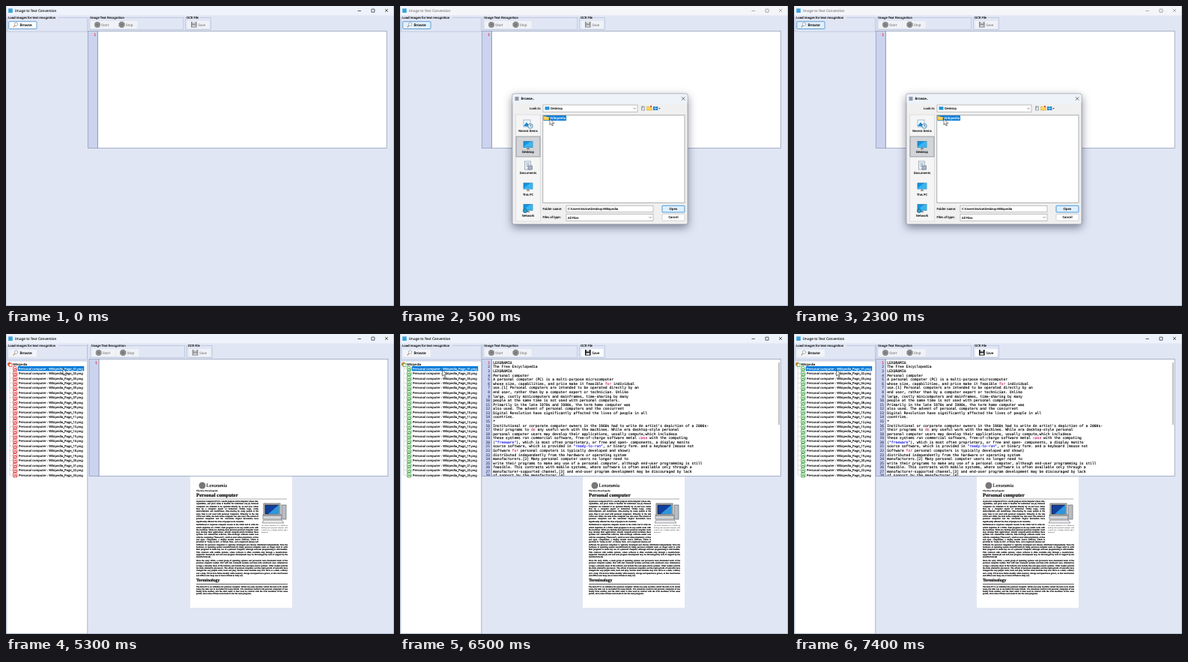
These frames come from a looping animation (518 by 400 pixels, 8 s). An HTML page:

```html
<!DOCTYPE html>
<html lang="en">
<head>
<meta charset="utf-8">
<title>Image to Text Conversion</title>
<style>
html, body { margin: 0; width: 100%; height: 100%; overflow: hidden; background: #e0e6f4; }
svg { display: block; width: 518px; height: 400px; font-family: "Noto Sans", sans-serif; text-rendering: geometricPrecision; }
text { white-space: pre; stroke-width: .13px; }
.mono { font-family: "DejaVu Sans Mono", monospace; }
.serif { font-family: "Liberation Serif", serif; }
.dialog { filter: drop-shadow(0 4px 6px rgba(20, 25, 45, .5)); }
.page { font: 2.85px/3.32px "Liberation Serif", serif; color: #000; text-align: justify; -webkit-text-stroke: .16px #000; }
.page p { margin: 0 0 1.4px; }
.page h2 { font-size: 5.8px; line-height: 7px; margin: 0 0 2px; border-bottom: .5px solid #555; }
.page figure { float: right; width: 35px; height: 54px; margin: 2px 0 0 4px; font-size: 2.3px; line-height: 3px; -webkit-text-stroke: 0; }
.page svg { width: 35px; height: 31px; }
</style>
</head>
<body>
<svg id="stage" viewBox="0 0 518 400"></svg>
<script>
const BLUE = '#0078d7', LINE = '#b4bed6', PANEL = '#e0e6f4';

const ocr = `LEXORAMIA
The Free Encyclopedia
LEXORAMIA
Personal computer
A personal computer (PC) is a multi-purpose microcomputer
whose size, capabilities, and price make it feasible for individual
use.[1] Personal computers are intended to be operated directly by an
end user, rather than by a computer expert or technician. Unlike
large, costly minicomputers and mainframes, time-sharing by many
people at the same time is not used with personal computers.
Primarily in the late 1970s and 1980s, the term home computer was
also used. The advent of personal computers and the concurrent
Digital Revolution have significantly affected the lives of people in all
countries.
*
Institutional or corporate computer owners in the 1960s had to write An artist's depiction of a 2000s-
their programs to do any useful work with the machines. While era desktop-style personal
personal computer users may develop their applications, usually compute,which includesa
these systems run commercial software, free-of-charge software metal case with the computing
("freeware"), which is most often proprietary, or free and open- components, a display monito
source software, which is provided in "ready-to-run", or binary form. and a keyboard (mouse not
Software for personal computers is typically developed and shown)
distributed independently from the hardware or operating system
manufacturers.[2] Many personal computer users no longer need to
write their programs to make any use of a personal computer, although end-user programming is still
feasible. This contrasts with mobile systems, where software is often available only through a
manufacturer-supported channel,[3] and end-user program development may be discouraged by lack
of support by the manufacturer.[4]`.split('\n');

const later = `Since the early 1990s, a small group of operating systems and processors have dominated much of the personal computer market, first with text command systems and then with windowed ones. Alternatives occupy a minority share of the industry and include free and open-source systems. Other makers provide the main alternative processors. The advent of personal computers and the rapid growth of networks have changed the way people work, learn and play, and the same machine may now serve as a desk, a library and a shop. Prices have fallen steadily while memory, storage and speed have grown, so that most homes and offices now keep one or more of them in daily use.`;
const terms = `The term PC is an initialism for personal computer. While one early machine carried the term in its model name, the term was in use before for many brands. It is sometimes useful to tell personal computers of one family from another, and the short name is then used in contrast with the rival machines of the same period, since none of these were made to run the same programs.`;

const esc = s => s.replace(/&/g, '&amp;').replace(/</g, '&lt;');
const rect = (x, y, w, h, fill, stroke = 'none', more = '') =>
  `<rect x="${x}" y="${y}" width="${w}" height="${h}" fill="${fill}" stroke="${stroke}" stroke-width=".7" ${more}/>`;
const path = (d, stroke, fill = 'none', width = .7) =>
  `<path d="${d}" stroke="${stroke}" fill="${fill}" stroke-width="${width}"/>`;
const circle = (x, y, r, fill, stroke = 'none') =>
  `<circle cx="${x}" cy="${y}" r="${r}" fill="${fill}" stroke="${stroke}" stroke-width=".8"/>`;
const rawText = (x, y, s, size = 4.15, fill = '#000', more = '') =>
  `<text x="${x}" y="${y}" font-size="${size}" fill="${fill}" stroke="${fill}" ${more}>${s}</text>`;
const text = (x, y, s, ...style) => rawText(x, y, esc(s), ...style);
const move = (x, y, s) => `<g transform="translate(${x} ${y})">${s}</g>`;

const cursor = (x, y) => move(x, y, path('M0 0v8l1.9-1.7 1.3 3 1.3-.6-1.3-2.9h2.6z', '#222', '#fff', .6));
const folder = (x, y) => move(x, y,
  path('M0 5.5v-5h2.6l1 1h3.2v4z', '#c9921a', '#ffcf4d', .4) + path('M.3 2.4h6.2', '#ffe9a6'));
const monitor = (x, y, tower) => move(x, y,
  rect(-6, -5, 12, 8, '#1593e0', '#2c6d9c') + path('M-6 2L3-5h3v8h-12z', 'none', '#39b5f0') +
  path('M-2 5h4M0 3v2', '#667', 'none', 1) + (tower ? circle(-4, 3.5, 2.6, '#2fa0cf', '#176387') : ''));

function titleBar(active) {
  const ink = active ? '#222' : '#888';
  return rect(0, 0, 518, 12.5, active ? '#eef3fb' : '#f3f5f9') +
    rect(3.2, 3.4, 5.6, 5.6, '#3ba3dc') +
    text(12, 8, 'Image to Text Conversion', 4.64, ink) +
    path('M469.5 6.5h4.5M488 4.2h4v4h-4zM506 4l4 4M510 4l-4 4', ink);
}

function group(x, y, w, h, label) {
  return rect(x, y, w, h, 'none', LINE) +
    rect(x + 1, 13, label.length * 2.08 + 1, 4.7, PANEL) + text(x + 1.5, 17.1, label);
}

function toolbar({ dx, browse, canSave }) {
  const off = '#8c8c8c', save = canSave ? '#111' : off;
  const fill = browse === 'hover' ? '#e3f0fb' : browse === 'focus' ? '#fdfdfe' : '#f2f4f9';
  return group(1.5, 15.5, 107, 18.5, 'Load images for text recognition') +
    rect(3.7, 20.7, 37.3, 9.8, fill, browse ? '#2b7fc4' : 'none', 'rx=".8"') +
    circle(13.5, 24.2, 2.2, '#f4fafe', '#8fa3b5') + path('M12 25.9l-2.3 2.5', '#c18b5a', 'none', 1.2) +
    text(18.5, 27, 'Browse', 4.65) +
    move(dx, 0,
      group(110.8, 15.5, 126, 16, 'Image Text Recognition') +
      rect(113, 20, 31.5, 10, '#f0f2f7') + circle(122, 24.9, 4, off) +
      path('M120.8 22.8l3.4 2.1-3.4 2.1z', 'none', '#777') + text(127.3, 26.5, 'Start', 4.5, off) +
      rect(145, 20, 30.5, 10, '#f0f2f7') +
      path('M152.8 20.8h3.4l2.4 2.4v3.4l-2.4 2.4h-3.4l-2.4-2.4v-3.4z', 'none', off) +
      rect(152.8, 23.4, 3.4, 3.2, '#777') + text(160, 26.5, 'Stop', 4.5, off) +
      group(239.5, 15.5, 34, 16, 'OCR File') +
      rect(242, 20, 29.5, 10, canSave ? '#fbfcfe' : '#f0f2f7') +
      rect(247, 21, 7.6, 7.6, save) + rect(248.7, 21, 4.2, 2.6, '#d7dae0') +
      rect(248.4, 25, 4.8, 3, '#c3c7d0') + text(256.5, 26.5, 'Save', 4.5, save));
}

function editor(dx, lines) {
  const tint = color => `<tspan fill="${color}" stroke="${color}">$&</tspan>`;
  const paint = s => esc(s)
    .replace(/\b(do|case|for)\b/g, tint('#c0206a'))
    .replace(/"[a-z-]+"(?=[),])/g, tint('#1717e0'));
  const rows = lines.map((s, i) => {
    const y = 39.9 + i * 5.575;
    return text(120.2, y, String(i + 1), 4.7, i ? '#3c4670' : '#e8283c', 'class="mono" text-anchor="end"') +
      rawText(124.2, y, paint(s), 4.7, '#000', 'class="mono"');
  }).join('');
  const scrollbar = lines.length > 1 ? path('M506 38v83', '#858585', 'none', 1) : '';
  return move(dx, 0, rect(109.3, 33.5, 398.9, 156, '#fff') + rect(109.3, 33.5, 13, 156, '#cbd3ef') +
    `<g clip-path="url(#edit)">${rows}</g>` + scrollbar +
    path('M122.4 33.5v156', '#66718f') + rect(109.3, 33.5, 398.9, 156, 'none', '#8793b3'));
}

function tree(color, rootColor) {
  let s = rect(1, 36, 107.5, 364, '#fff', LINE) + path('M5 43v145', '#aaa', 'none', .4) +
    circle(4.6, 40.2, 2.6, rootColor) + rect(4.2, 39.2, 3.8, 4.4, '#fff', color) + text(9.3, 41.6, 'Wikipedia');
  for (let i = 0; i < 23; i++) {
    const y = 46.1 + i * 6.45, number = String(i + 1).padStart(2, '0');
    if (!i) s += rect(16, y - 3.2, 88.2, 6.4, BLUE);
    s += path(`M5 ${y}h4`, '#aaa', 'none', .4) +
      move(9.8, y - 2.8, path('M0 0h3.4l1.6 1.6v4h-5z', color, '#fff', .9) + path('M1 4.6l1.5-3 1.4 3M1 3.3h3', color)) +
      text(17, y + 1.5, `Personal computer - Wikipedia_Page_${number}.png`, 4.12, i ? '#000' : '#fff');
  }
  return s + path('M109 13v387', LINE);
}

function pagePreview(x) {
  const computer = `<svg viewBox="0 0 35 31">${rect(0, 0, 35, 31, '#fff')}
    ${rect(2, 17, 25, 6, '#d4d6da', '#777')}${rect(3, 2, 22, 16, '#c4c9d0', '#444')}
    ${rect(5, 4, 18, 12, '#123f9c', '#111')}${path('M9 16L23 4v12z', 'none', '#2f96de')}
    ${rect(27, 4, 6, 19, '#b9bec6', '#666')}${path('M3 24h24l3 4H1z', '#777', '#e9ebee')}</svg>`;
  const body = `<div xmlns="http://www.w3.org/1999/xhtml" class="page">
    <figure>${computer}An artist's depiction of a 2000s-era desktop-style personal computer, with a metal case, a display monitor and a keyboard</figure>
    <p>${ocr.slice(4, 14).join(' ')}</p><p>${ocr.slice(15).join(' ')}</p><p>${later}</p>
    <h2>Terminology</h2><p>${terms}</p></div>`;
  return move(x, 190, rect(0, 0, 136, 175, '#fff') + circle(16, 12, 4.5, '#777') +
    text(21.5, 14, 'Lexoramia', 6.4, '#000', 'class="serif"') +
    text(8, 19.5, 'The Free Encyclopedia', 3.1, '#000', 'class="serif"') +
    text(8, 27.3, 'Personal computer', 6.9, '#000', 'class="serif" font-weight="bold"') +
    path('M8 30h121', '#555', 'none', .5) +
    `<foreignObject x="8" y="32" width="122" height="140">${body}</foreignObject>`);
}

function dialog() {
  const place = (y, label, icon) => icon + text(171, y + 10.6, label, 4.15, '#000', 'text-anchor="middle"');
  const arrow = (x, y) => path(`M${x} ${y}l1.6 1.6 1.6-1.6`, '#444', 'none', .6);
  return `<g class="dialog">${rect(150, 117, 234, 174, '#f0f0f0', '#8a919d', 'rx="2"')}</g>` +
    rect(150.4, 117.4, 233.2, 12.6, '#eef3fa', 'none', 'rx="2"') +
    rect(153.5, 121, 5, 5.2, '#8c98a8') + text(161.5, 125.3, 'Browse..', 4.4) +
    path('M376 121.3l4.4 4.4M380.4 121.3l-4.4 4.4', '#333') +
    text(173, 138.4, 'Look in:') + rect(191, 132, 126, 9.2, '#fff', '#a5a5a5') +
    rect(193.5, 134.2, 6, 4.3, '#1c94dc') + text(201, 138.3, 'Desktop') + arrow(311.5, 135.8) +
    path('M322.5 134h4v5h-4zM324 137v-4', '#77868f', '#e8edf0') + folder(329.5, 133.6) + circle(335, 134, 1.2, '#e0542c') +
    rect(338, 134, 6.3, 5, '#1c83d2') + path('M339 136.5h4.3M341.1 134v5', '#fff', 'none', .5) +
    path('M345.3 136h2.4l-1.2 1.4z', 'none', '#333') +
    rect(154.5, 145, 33, 142, '#f5f5f5', '#d4d4d4') + rect(155, 174, 32, 27, '#d2d4d7', '#7d8288') +
    place(157, 'Recent Items', rect(165, 152, 9, 9, '#f6fafd', '#7ba4c4') + path('M165 160l4-5 5 6z', 'none', '#1e86ce') + circle(174, 160, 3.2, '#e6f0f6', '#2c7cb2') + path('M174 158v2h1.6', '#246')) +
    place(185, 'Desktop', monitor(171, 185.5)) +
    place(213, 'Documents', rect(166.5, 207, 8, 11, '#eef2f6', '#8496a6') + path('M168.3 209.5h4.5M168.3 211.5h4.5M168.3 213.5h4.5', '#6d92b4') + rect(171, 213, 5.5, 5, '#a3b5c5', '#778')) +
    place(242, 'This PC', monitor(171, 241)) +
    place(270, 'Network', monitor(171, 269.5, true)) +
    rect(190.8, 145.3, 189.2, 117, '#fff', '#8d9095') +
    rect(191.5, 146, 30.5, 6.8, BLUE) + folder(192, 146.5) + text(200.3, 151, 'Wikipedia', 4.6, '#fff') +
    text(190.5, 272, 'Folder name:') + rect(222, 266.2, 116, 8.6, '#fff', '#a5a5a5') +
    text(224, 272, 'C:\\Users\\Nolva\\Desktop\\Wikipedia') +
    text(190.5, 282.7, 'Files of type:') + rect(222, 277.4, 116, 9, '#fff', '#a5a5a5') +
    text(224, 283.6, 'All Files') + arrow(332.5, 281) +
    rect(350, 266.2, 30, 8.8, '#e1effa', BLUE, 'rx=".8"') + text(365, 272, 'Open', 4.2, '#000', 'text-anchor="middle"') +
    rect(350, 277.4, 30, 8.8, '#fdfdfd', '#c6c6c6', 'rx=".8"') + text(365, 283.2, 'Cancel', 4.2, '#000', 'text-anchor="middle"') +
    cursor(200, 150.5);
}

function scene({ dx = 0, active = true, browse, canSave, lines = [''], extra = '' }) {
  return `<clipPath id="edit">${rect(109.3, 33.5, 398.9, 155.7, '#000')}</clipPath>` +
    rect(0, 0, 518, 400, PANEL) + titleBar(active) + toolbar({ dx, browse, canSave }) +
    editor(dx, lines) + extra + path('M0 0v399.6h518M517.7 0v400', '#8e9bb8', 'none', .6);
}

const scenes = [
  { until: 500, art: scene({ browse: 'focus' }) },
  { until: 3500, art: scene({ active: false, browse: 'hover', extra: dialog() }) },
  { until: 6500, art: scene({ dx: 1.7, extra: tree('#e03030', '#e0662c') + pagePreview(246) + cursor(76, 46.5) }) },
  { until: 8000, art: scene({ canSave: true, lines: ocr, extra: tree('#35a03c', '#c98a35') + pagePreview(244) + cursor(56.5, 48) }) }
];

const stage = document.getElementById('stage');
let shown;
function tick() {
  const t = performance.now() % 8000;
  const current = scenes.find(s => t < s.until);
  if (current !== shown) stage.innerHTML = (shown = current).art;
  requestAnimationFrame(tick);
}
tick();
</script>
</body>
</html>
```
